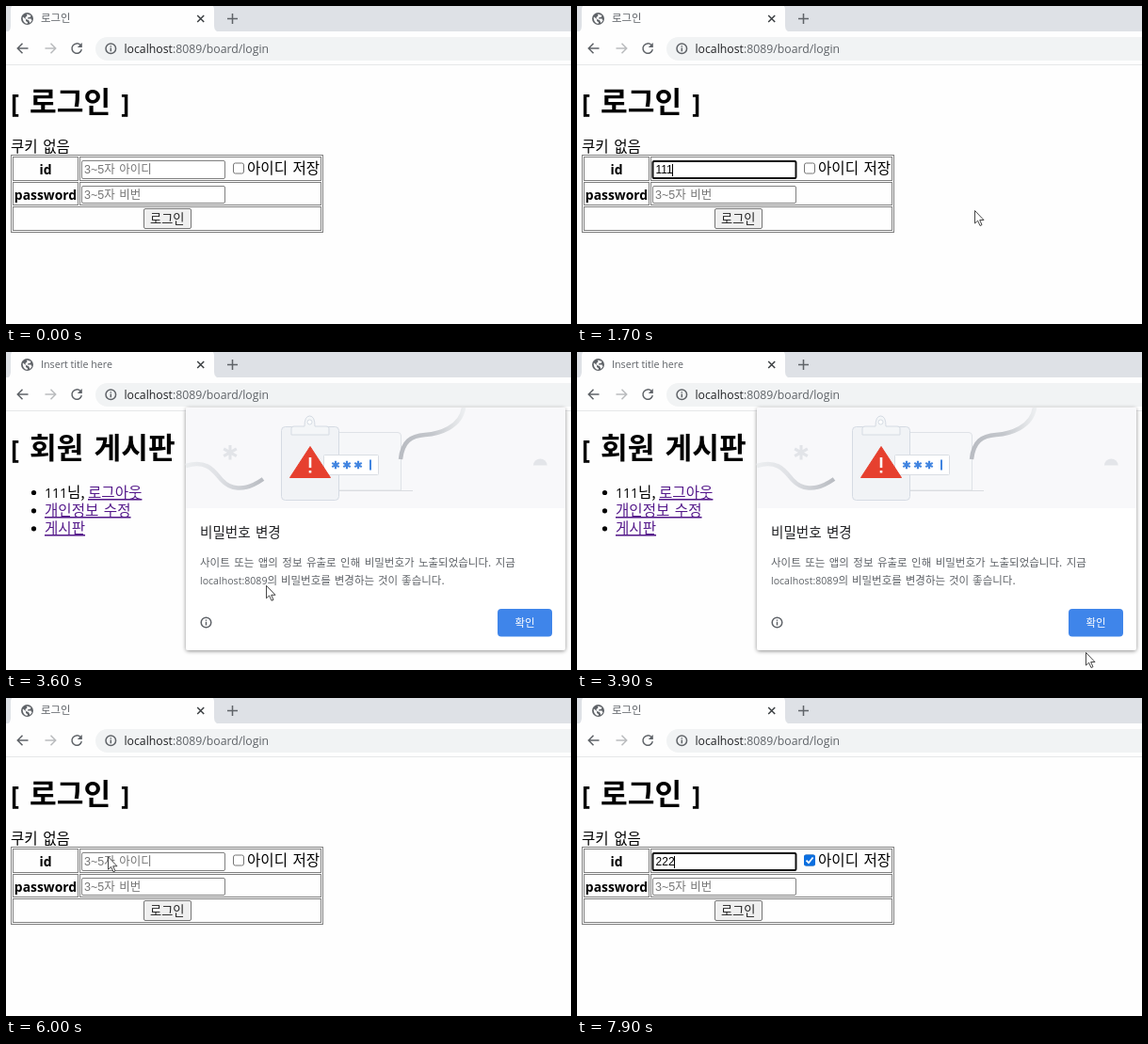
Recreate the animation shown at these times as an HTML page. Size 600 px wide and 338 px high, loop 8 s.

```html
<!DOCTYPE html>
<html lang="ko">
<head>
<meta charset="utf-8">
<title>Login form</title>
<style>
  html, body { margin: 0; width: 100%; height: 100%; overflow: hidden; background: #fefefe; }
  svg { display: block; width: 600px; height: 338px; }
  text { font: 15.6px "Noto Sans CJK KR", "Noto Sans CJK JP", sans-serif; white-space: pre; word-spacing: 1.1px; }
  .latin { font-family: "Open Sans", "Noto Sans CJK KR", sans-serif; word-spacing: 0; }
  .h1 { font-size: 31.2px; font-weight: 700; word-spacing: 2.4px; }
  .h1 .latin { font-size: 27px; }
  .th { font-size: 13.9px; font-weight: 700; text-anchor: middle; }
  .tab { font-size: 11.4px; fill: #5f6368; }
  .url { font-size: 12.27px; fill: #5f6368; }
  .link { fill: #551a8b; text-decoration: underline; }
  .hint { font: 12.5px "Liberation Sans", "Noto Sans CJK KR", sans-serif; fill: #757575; }
  .value { font: 12px "Liberation Sans", sans-serif; }
  .cell { fill: none; stroke: #808080; }
  .input { fill: #fff; stroke: #808080; }
  .ring { fill: #fff; stroke: #101010; stroke-width: 2; }
  .icon { fill: none; stroke: #5f6368; stroke-width: 1.5; }
  .note { font-size: 11.5px; fill: #5f6368; word-spacing: 1.2px; }
  .pointer { fill: #fff; stroke: #333; stroke-width: .9; }
</style>
</head>
<body>
<svg viewBox="0 0 600 338">
  <defs>
    <filter id="shadow" x="-10%" y="-10%" width="120%" height="120%">
      <feDropShadow dx="0" dy="1" stdDeviation="2" flood-opacity=".45"/>
    </filter>
    <linearGradient id="cordL"><stop offset="0" stop-color="#eceef0"/><stop offset=".4" stop-color="#e0e2e6"/><stop offset="1" stop-color="#b9bcc2"/></linearGradient>
    <linearGradient id="cordR"><stop offset="0" stop-color="#b9bcc2"/><stop offset=".5" stop-color="#c4c7cc"/><stop offset="1" stop-color="#eceef0"/></linearGradient>
    <path id="star" d="M0-5V5M-4.4-2.5 4.4 2.5M-4.4 2.5 4.4-2.5"/>
    <g id="info" class="icon"><circle r="5.3"/><path d="M0-.8V3M0-3V-1.7"/></g>
  </defs>

  <!-- browser frame -->
  <rect width="600" height="27" fill="#dee1e6"/>
  <path d="M0 28Q5 27 5 21V4Q5-2 11-2H215Q221-2 221 4V21Q221 27 227 28Z" fill="#fefefe"/>
  <circle cx="22.5" cy="13.5" r="6.5" fill="#5f6368"/>
  <path d="M18 11.5 21 14v2l2 1.2-.5 1.8Q18 18 17.7 13ZM22 8.5l4.5 1.5-1 2h-2l-.5 1.5h3.5l1 2-2 2.5-1.5-3-3-1-.5-2 2-1.5Z" fill="#fefefe"/>
  <text class="tab" x="37" y="17.3" data-on="0-3500 5900-8000">로그인</text>
  <text class="tab latin" x="37" y="17.3" style="font-size:10.7px" data-on="3500-5900">Insert title here</text>
  <g class="icon">
    <path d="M203.2 10 210.2 17M210.2 10 203.2 17" stroke="#3c4043"/>
    <path d="M235 13.5H246M240.5 8V19"/>
    <path d="M23.5 45H12.5M17.5 39.8 12.3 45 17.5 50.2"/>
    <path d="M41.5 45H52.5M47.5 39.8 52.7 45 47.5 50.2" style="stroke:#babcbe"/>
    <path d="M79 41.5A5.2 5.2 0 1 0 80.3 46.2"/>
  </g>
  <path d="M80.8 39V44H75.8Z" fill="#5f6368"/>
  <rect x="95" y="33" width="540" height="25" rx="12.5" fill="#f1f3f4"/>
  <use href="#info" x="111.3" y="45.3"/>
  <text class="url latin" x="125.5" y="49.8"><tspan fill="#202124">localhost</tspan>:8089/board/<tspan data-on="0-5000 5900-8000">login</tspan></text>
  <path d="M0 62.5H600" stroke="#e6e7e9"/>

  <!-- login form -->
  <g data-on="0-3500 5900-8000">
    <text class="h1" x="5" y="113"><tspan class="latin">[</tspan> 로그인 <tspan class="latin">]</tspan></text>
    <text x="5" y="155">쿠키 없음</text>
    <g class="cell">
      <rect x="5.5" y="158.5" width="331" height="82"/>
      <rect x="7.5" y="160.5" width="69" height="25"/>
      <rect x="78.5" y="160.5" width="256" height="25"/>
      <rect x="7.5" y="187.5" width="69" height="24"/>
      <rect x="78.5" y="187.5" width="256" height="24"/>
      <rect x="7.5" y="213.5" width="327" height="25"/>
    </g>
    <text class="th latin" x="42" y="178.7">id</text>
    <text class="th latin" x="42" y="205.5">password</text>

    <rect class="input" x="80.5" y="164.5" width="152" height="19" rx="1.5"/>
    <rect class="ring" x="80.5" y="165" width="152" height="18" rx="1.5" data-on="1100-1900 7300-8000"/>
    <text class="hint" x="83" y="178" data-on="0-1400 5900-7600">3~5자 아이디</text>
    <text class="value" x="83.5" y="178.3"><tspan data-on="1400-3500">1</tspan><tspan data-on="1500-3500">1</tspan><tspan data-on="1600-3500">1</tspan></text>
    <text class="value" x="83.5" y="178.3"><tspan data-on="7600-8000">2</tspan><tspan data-on="7700-8000">2</tspan><tspan data-on="7800-8000">2</tspan></text>
    <path id="caret" d="M83.5 168V181" stroke="#000" data-on="1100-1900 7300-8000"/>

    <rect class="input" x="80.5" y="191.5" width="152" height="18" rx="1.5"/>
    <rect class="ring" x="80.5" y="191" width="152" height="18" rx="1.5" data-on="1900-3500"/>
    <text class="hint" x="83" y="204.5" data-on="0-2000 5900-8000">3~5자 비번</text>
    <circle cx="85.7" cy="200.3" r="1.7" data-on="2000-3500"/>
    <circle cx="90.1" cy="200.3" r="1.7" data-on="2100-3500"/>
    <circle cx="94.5" cy="200.3" r="1.7" data-on="2200-3500"/>

    <rect x="241.5" y="167" width="11" height="11" rx="2" fill="#fff" stroke="#767676"/>
    <g data-on="6400-8000">
      <rect x="241" y="166.5" width="12" height="12" rx="2" fill="#0b6fe0"/>
      <path d="M243.5 172.6 246 175.2 250.6 169.5" fill="none" stroke="#fff" stroke-width="1.8"/>
    </g>
    <text x="256" y="178">아이디 저장</text>

    <rect x="146.5" y="215.5" width="50" height="21" rx="1.5" fill="#efefef" stroke="#767676"/>
    <rect x="146.5" y="215.5" width="50" height="21" rx="1.5" fill="#e3e3e3" stroke="#5a5a5a" data-on="2300-3500"/>
    <text x="153" y="231" style="font-size:13.2px" fill="#222">로그인</text>
  </g>

  <!-- board menu -->
  <g data-on="3500-5900">
    <text class="h1" x="5" y="113"><tspan class="latin">[</tspan> 회원 게시판 <tspan class="latin">]</tspan></text>
    <circle cx="29.5" cy="149.5" r="2.6"/><circle cx="29.5" cy="168.8" r="2.6"/><circle cx="29.5" cy="187.8" r="2.6"/>
    <g data-on="3500-5000">
      <text x="41" y="155"><tspan class="latin" style="font-size:14px">111</tspan>님,</text>
      <text class="link" x="87" y="155">로그아웃</text>
      <text class="link" x="41" y="174">개인정보 수정</text>
    </g>
    <g data-on="5000-5900">
      <text class="link" x="41" y="155">회원가입</text>
      <text class="link" x="41" y="174">로그인</text>
    </g>
    <text class="link" x="41" y="193">게시판</text>
  </g>

  <!-- password warning -->
  <g data-on="3600-4300">
    <rect x="191" y="59" width="403" height="258" rx="3" fill="#fff" filter="url(#shadow)"/>
    <path d="M191 62Q191 59 194 59H591Q594 59 594 62V166H191Z" fill="#f8f8fa"/>
    <path d="M354 85.5H416Q419.5 85.5 419.5 89V147H354" fill="#f6f7f9" stroke="#dfe2e7"/>
    <path d="M354 147.5H432" stroke="#dadce0"/>
    <g fill="none" stroke-width="4.5">
      <path d="M191 121C214 114 221 127 229 136S252 150 273 135" stroke="url(#cordL)"/>
      <path d="M419 114C421 95 430 89 445 88S483 80 486 59" stroke="url(#cordR)"/>
    </g>
    <use href="#star" transform="translate(238 106.8) scale(1.55)" stroke="#e2e4e8" stroke-width="2"/>
    <path d="M560 120.5A7.3 7 0 0 1 574.6 120.5Z" fill="#e3e5e9"/>
    <rect x="292.5" y="79.5" width="61" height="78" rx="4" fill="#f1f3f6" stroke="#d5dbe3"/>
    <path d="M303 88V81Q303 79 306 79H317Q317 68 322.5 68T328 79H340Q343 79 343 81V88Z" fill="#f4f6f8" stroke="#d5dbe3"/>
    <circle cx="322.5" cy="74.5" r="2.5" fill="#fff" stroke="#d5dbe3"/>
    <rect x="337.5" y="109.5" width="58" height="21" rx="1" fill="#fff" stroke="#d9dde3"/>
    <g stroke="#4285e0" stroke-width="2.6">
      <use href="#star" transform="translate(350 120) scale(.85)"/>
      <use href="#star" transform="translate(362 120) scale(.85)"/>
      <use href="#star" transform="translate(374 120) scale(.85)"/>
      <path d="M387 114.5V125.5" stroke-width="2"/>
    </g>
    <path d="M323 100.5 344.5 133.5H301.5Z" fill="#e6402f" stroke="#e6402f" stroke-linejoin="round"/>
    <path d="M323 112V123M323 126V128.5" stroke="#fff" stroke-width="2.6"/>
    <text x="206" y="197" style="font-size:14.6px" fill="#202124">비밀번호 변경</text>
    <text class="note" x="206" y="227.5">사이트 또는 앱의 정보 유출로 인해 비밀번호가 노출되었습니다. 지금</text>
    <text class="note" x="206" y="246.5" style="word-spacing:.7px"><tspan class="latin" style="font-size:10.6px">localhost:8089</tspan>의 비밀번호를 변경하는 것이 좋습니다.</text>
    <use href="#info" x="212.5" y="287.5"/>
    <rect x="522" y="273" width="58" height="29.5" rx="4" fill="#3f85ea"/>
    <text x="540.5" y="291.8" style="font-size:11.5px" fill="#fff">확인</text>
  </g>

  <g id="mouse">
    <path class="pointer" data-kind="arrow" d="M.5.5V14L3.6 11.2 6 16.5 8 15.6 5.7 10.5H10Z"/>
    <path class="pointer" data-kind="hand" d="M4.5 10V2Q4.5.5 6 .5T7.5 2V7Q9.5 6 10 7.8 12 7 12.3 8.6 14.5 8 14.5 10V14Q14.5 17 12.5 19H6.5Q3 15.5.8 11.5 1.5 9.5 4.5 12Z"/>
    <path data-kind="beam" d="M-2.5-7H2.5M0-7V7M-2.5 7H2.5" fill="none" stroke="#222"/>
  </g>
</svg>
<script>
  const LOOP = 8000, STEP = 100;
  const byId = id => document.getElementById(id);
  const mouse = byId("mouse"), caret = byId("caret");
  const kinds = [...mouse.children];

  // time, x, y, pointer shown from then on
  const path = [
    [0, 0, 0, ""],
    [100, 436, 271, "arrow"], [800, 228, 174, "beam"], [1000, 190, 174, "beam"],
    [1200, 300, 250, "arrow"], [1400, 447, 320, "arrow"], [1700, 422, 217, "arrow"],
    [1800, 318, 214, "arrow"], [2300, 188, 224, "arrow"], [3500, 188, 224, "arrow"],
    [3900, 540, 319, "arrow"], [4200, 537, 292, "arrow"], [4400, 537, 292, "arrow"],
    [4800, 112, 151, "hand"], [5500, 112, 151, "hand"], [5700, 62, 167, "hand"],
    [5900, 62, 167, "arrow"], [6300, 246, 172, "arrow"], [6500, 246, 172, "arrow"],
    [6800, -14, 182, ""], [7000, 10, 180, "arrow"], [7200, 150, 174, "beam"],
    [7400, 180, 176, "arrow"], [7700, 318, 345, ""], [LOOP, 318, 345, ""]
  ];

  const timed = [...document.querySelectorAll("[data-on]")].map(el => ({
    el, spans: el.dataset.on.split(" ").map(s => s.split("-").map(Number))
  }));

  function moveMouse(t) {
    const i = path.findIndex(p => p[0] > t);
    const [t0, x0, y0, kind] = path[i - 1], [t1, x1, y1] = path[i];
    const k = (t - t0) / (t1 - t0);
    mouse.setAttribute("transform", `translate(${x0 + (x1 - x0) * k} ${y0 + (y1 - y0) * k})`);
    for (const el of kinds) el.style.display = el.dataset.kind === kind ? "" : "none";
  }

  function moveCaret(t) {
    // "1" pairs are kerned, so they advance less than "2"
    const [start, advance] = t < 4000 ? [1400, 6] : [7600, 6.67];
    const typed = Math.max(0, Math.min(3, (t - start) / STEP + 1));
    caret.setAttribute("transform", `translate(${Math.round(typed * advance)} 0)`);
  }

  function draw(now) {
    const t = Math.floor(now % LOOP / STEP) * STEP;
    for (const { el, spans } of timed)
      el.style.display = spans.some(([a, b]) => t >= a && t < b) ? "" : "none";
    moveCaret(t);
    moveMouse(t);
    requestAnimationFrame(draw);
  }
  draw(0);
</script>
</body>
</html>
```
